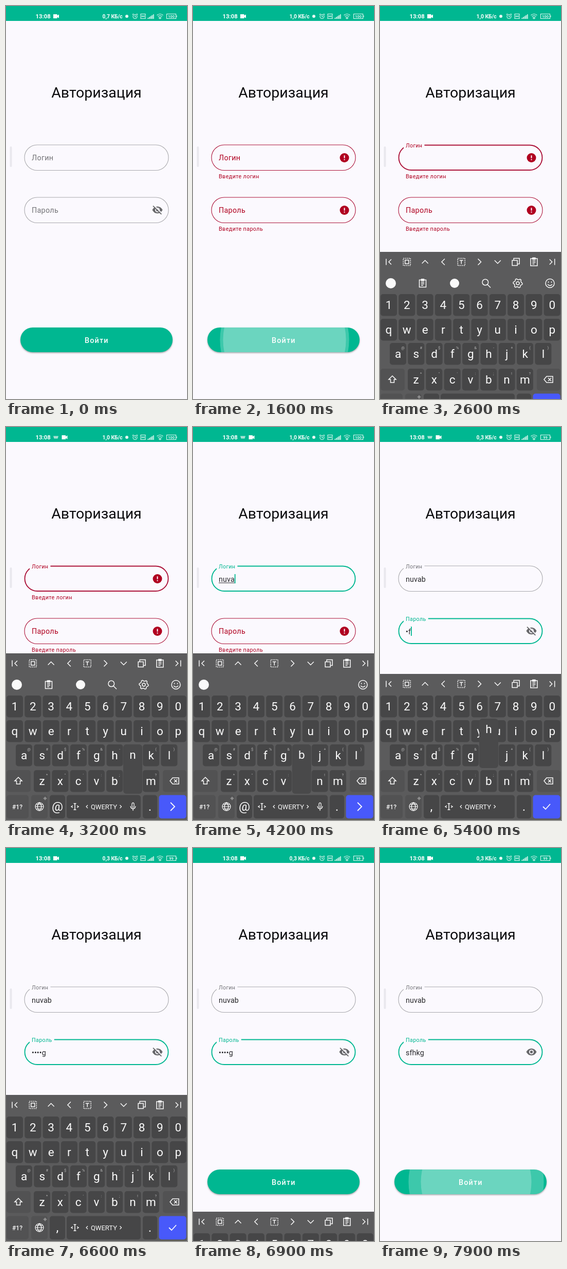
An HTML page with a canvas for the animation above (8 s loop, 352 by 764 pixels).

```html
<!DOCTYPE html>
<html lang="ru">
<head>
<meta charset="utf-8">
<title>Авторизация</title>
<style>
html, body { margin: 0; width: 100%; height: 100%; overflow: hidden; background: #fbf9fe; }
canvas { display: block; width: 352px; height: 764px; }
</style>
</head>
<body>
<canvas id="stage"></canvas>
<script>
const W = 352, H = 764, LOOP = 8000;
const BG = '#fbf9fe', GREEN = '#00b791', RED = '#b00020', GREY = '#737377';
const KEYBOARD = '#5b5b5c', KEY = '#464647', SIDE_KEY = '#525253', WHITE = '#fafafa';
const canvas = document.getElementById('stage');
const ctx = canvas.getContext('2d');
const dpr = window.devicePixelRatio || 1;
canvas.width = W * dpr;
canvas.height = H * dpr;

// Moments of the story, in ms
const ERROR = 400, LOGIN_FOCUS = 2400, PASS_FOCUS = 4700, PASS_KEYS = 4800;
const HIDE = 6650, REVEAL = 7100;
const loginKeys = [['n', 3300], ['u', 3560], ['v', 3800], ['a', 4040], ['b', 4260]];
const passKeys = [['s', 5060], ['f', 5300], ['h', 5480], ['k', 5740], ['g', 6000]];
const strokes = [...loginKeys, ...passKeys];
const LOGIN_START = loginKeys[0][1], PASS_START = passKeys[0][1];

const clamp = v => Math.max(0, Math.min(1, v));
const progress = (t, start, length) => clamp((t - start) / length);
const mix = (a, b, p) => a + (b - a) * p;
const typed = (keys, t) => keys.filter(k => k[1] <= t).map(k => k[0]).join('');

function text(str, x, y, size, color, { weight = 400, align = 'left', spacing = 0 } = {}) {
  ctx.font = `${weight} ${size}px Roboto, sans-serif`;
  ctx.textAlign = align;
  ctx.letterSpacing = spacing + 'px';
  ctx.fillStyle = color;
  ctx.fillText(str, x, y);
  return ctx.measureText(str).width;
}

function box(x, y, w, h, r, color) {
  ctx.fillStyle = color;
  ctx.beginPath();
  ctx.roundRect(x, y, w, h, r);
  ctx.fill();
}

function disc(x, y, r, color) {
  ctx.fillStyle = color;
  ctx.beginPath();
  ctx.arc(x, y, r, 0, Math.PI * 2);
  ctx.fill();
}

// Strokes or fills an SVG path placed around (x, y)
function icon(d, x, y, { color = WHITE, width = 1.5, fill = false } = {}) {
  ctx.save();
  ctx.translate(x, y);
  ctx.lineWidth = width;
  ctx.strokeStyle = ctx.fillStyle = color;
  const path = new Path2D(d);
  fill ? ctx.fill(path) : ctx.stroke(path);
  ctx.restore();
}

const circle = r => `M${-r} 0a${r} ${r} 0 1 0 ${2 * r} 0a${r} ${r} 0 1 0 ${-2 * r} 0z`;
const square = r => `M${-r} ${-r}h${2 * r}v${2 * r}h${-2 * r}z`;
const CLIPBOARD = 'M-6.5 -6.5h13v14h-13zM-2.5 -8h5v3h-5zM-3 -2h6M-3 1h6M-3 4h4';

function statusBar(t) {
  ctx.fillStyle = GREEN;
  ctx.fillRect(0, 0, W, 29);
  text('13:08', 57.5, 24, 11.4, '#fff', { weight: 600 });
  const busy = t >= 2700 && t < 6400;
  if (busy) icon('M-5 -2.5h10l-1.5 5h-7z', 97, 20, { color: '#a5e2d3', fill: true });
  icon('M-5.5 -4h7.5v2.5l3.5 -2v7l-3.5 -2v2.5h-7.5z', busy ? 114 : 97.5, 20, { color: '#fff', fill: true });
  const speed = t < 700 ? '0,7' : t < 5100 ? '1,0' : '0,3';
  text(speed + ' КБ/с', 187.5, 24, 10.3, '#fff', { weight: 600 });

  const thin = { color: '#e6f8f3', width: 1.1 };
  disc(235, 20, 3, '#e6f8f3');
  icon(circle(4) + 'M0 -2.5v3h2M-5 -3.5l2 -2M5 -3.5l-2 -2', 251, 20.5, thin);
  icon(square(4.5) + 'M-2 -2v4M2 -2v4M-2 0h4', 266.5, 20, thin);
  for (let i = 0; i < 5; i++) {
    ctx.fillStyle = '#e6f8f3';
    ctx.fillRect(275.5 + i * 2.6, 23 - i * 1.7, 1.7, 2 + i * 1.7);
  }
  icon('M-6 -2Q0 -7 6 -2M-4 0.5Q0 -3 4 0.5M-2 3Q0 1 2 3L0 5z', 299.5, 20, thin);
  icon('M-9.5 -4.5h18v9h-18zM10 -1.5v3', 322, 20, thin);
  text(t < 5100 ? '100' : '99', 321.5, 22.8, 7.5, '#fff', { weight: 500, align: 'center' });
}

function errorIcon(x, y) {
  disc(x, y, 9, RED);
  ctx.fillStyle = '#fff';
  ctx.fillRect(x - 1, y - 4.6, 2, 5.4);
  ctx.fillRect(x - 1, y + 2.6, 2, 2);
}

function eyeIcon(x, y, open) {
  const color = '#68686b';
  icon('M-10 0Q-6.5 -6.8 0 -6.8T10 0Q6.5 6.8 0 6.8T-10 0z', x, y, { color, fill: true });
  disc(x, y, 4.5, BG);
  disc(x, y, 2.7, color);
  if (open) return;
  icon('M-7 -9L9.5 7.5', x, y, { color: BG, width: 2 });
  icon('M-8.5 -7.8L7.8 8.4', x, y, { color, width: 1.8 });
}

function field({ y, label, hint, value, error, errorAlpha, focused, lift, caret, underline }) {
  const color = error ? RED : focused ? GREEN : GREY;
  const inset = focused ? 0.5 : 0;
  ctx.strokeStyle = error ? '#ac1239' : focused ? GREEN : '#a9a9ad';
  ctx.lineWidth = focused ? 1.9 : 1.1;
  ctx.beginPath();
  ctx.roundRect(36 + inset, y + inset, 280 - 2 * inset, 49.5 - 2 * inset, 24.7 - inset);
  ctx.stroke();

  const size = mix(14.3, 10.75, lift);
  if (lift > 0) {
    ctx.font = '400 10.75px Roboto, sans-serif';
    ctx.letterSpacing = '.35px';
    ctx.fillStyle = BG;
    ctx.fillRect(46, y - 5, (ctx.measureText(label).width + 8) * lift, 12);
  }
  text(label, 50, y + mix(30, 5.3, lift), size, color, { spacing: 0.32 });
  if (error) {
    ctx.globalAlpha = errorAlpha;
    text(hint, 50, y + 65, 10.75, RED, { spacing: 0.4 });
    ctx.globalAlpha = 1;
    errorIcon(294.5, y + 25);
  }
  const width = text(value, 50, y + 30.8, 14.3, '#29292c', { spacing: 0.1 });
  ctx.fillStyle = '#29292c';
  if (underline) ctx.fillRect(50, y + 32.5, width, 1);
  ctx.fillStyle = GREEN;
  if (caret) ctx.fillRect(50 + width, y + 16, 1.8, 18);
}

// The caret restarts its blink at the latest keystroke
function caretOn(t, keys, shownFrom) {
  const last = keys.filter(k => k[1] <= t).pop();
  const base = last ? last[1] : shownFrom;
  return t >= base && (t - base) % 1000 < 500;
}

function form(t) {
  text('Авторизация', 176, 178, 28.5, '#0c0c0e', { align: 'center' });
  box(7.5, 273, 4, 40, 2, '#e9e8ee');

  const errorAlpha = progress(t, ERROR, 160);
  const onLogin = t >= LOGIN_FOCUS && t < PASS_FOCUS;
  const onPass = t >= PASS_FOCUS;
  field({
    y: 270, label: 'Логин', hint: 'Введите логин', value: typed(loginKeys, t),
    error: t >= ERROR && t < LOGIN_START, errorAlpha, focused: onLogin,
    lift: progress(t, LOGIN_FOCUS, 167), underline: onLogin && t >= LOGIN_START,
    caret: onLogin && caretOn(t, loginKeys, 2700)
  });

  const secret = typed(passKeys, t);
  const open = t >= REVEAL;
  const passError = t >= ERROR && t < PASS_START;
  field({
    y: 372, label: 'Пароль', hint: 'Введите пароль',
    value: open ? secret : '•'.repeat(Math.max(0, secret.length - 1)) + secret.slice(-1),
    error: passError, errorAlpha, focused: onPass,
    lift: progress(t, PASS_FOCUS, 167), caret: onPass && caretOn(t, passKeys, PASS_FOCUS)
  });
  if (!passError) eyeIcon(294.5, 396.5, open);
  if (open && t < 7500) {
    disc(295, 396, 18.5, `rgba(0,0,0,${0.1 * (1 - progress(t, 7200, 300))})`);
  }
}

function ripple(t, { start, x, outer, inner, life }) {
  const age = t - start;
  if (age < 0 || age > life) return;
  const grow = 80 * clamp(age / 150);
  const alpha = 0.24 * (1 - progress(age, 180, life - 180));
  for (const r of [outer, inner]) disc(x, 649, r + grow, `rgba(255,255,255,${alpha})`);
}

const taps = [
  { start: 400, x: 178, outer: 125, inner: 119, life: 600 },
  { start: 1600, x: 178, outer: 125, inner: 119, life: 500 },
  { start: 7900, x: 187, outer: 131, inner: 107, life: 500 }
];

function button(t) {
  ctx.save();
  ctx.shadowColor = 'rgba(0,0,0,.35)';
  ctx.shadowBlur = 3 * dpr;
  ctx.shadowOffsetY = 1.5 * dpr;
  box(28, 625, 296, 48, 24, GREEN);
  ctx.restore();
  ctx.save();
  ctx.beginPath();
  ctx.roundRect(28, 625, 296, 48, 24);
  ctx.clip();
  taps.forEach(tap => ripple(t, tap));
  ctx.restore();
  text('Войти', 153, 655, 14.3, '#fff', { weight: 500, spacing: 1.2 });
}

const PITCH = 35.3;
const rows = [
  { chars: '1234567890', x: 17, y: 543, hints: '' },
  { chars: 'qwertyuiop', x: 17, y: 591, hints: '' },
  { chars: 'asdfghjkl', x: 35, y: 638, hints: '@#$%&-+()' },
  { chars: 'zxcvbnm', x: 70, y: 688, hints: '*"\':;!?' }
];
const toolbar = [
  'M-5 -6v12M5 -5l-5 5l5 5',
  square(3.5),
  'M-6 3l6 -6l6 6',
  'M3 -6l-6 6l6 6',
  'M-3.5 -3h7M0 -3v7',
  'M-3 -6l6 6l-6 6',
  'M-6 -3l6 6l6 -6',
  'M-7 -3h10v10h-10zM-4 -3v-4h11v11h-4',
  CLIPBOARD,
  'M5 -6v12M-5 -5l5 5l-5 5'
];

function drawToolbar(y) {
  toolbar.forEach((d, i) => {
    const x = 17 + PITCH * i;
    icon(d, x, y);
    if (i === 1 || i === 4) {
      ctx.setLineDash([2, 1.5]);
      icon(square(7), x, y);
      ctx.setLineDash([]);
    }
  });
}

function drawSuggestions(y, idle) {
  disc(21, y, 10, WHITE);
  icon(circle(8.5) + 'M-4.5 2Q0 7 4.5 2M-3 -3.5v2.5M3 -3.5v2.5', 330.5, y);
  if (!idle) return;
  icon(CLIPBOARD, 83, y);
  disc(145, y, 9, WHITE);
  icon('M-7.5 -2a5.8 5.8 0 1 0 11.6 0a5.8 5.8 0 1 0 -11.6 0M2.5 2.5l6 6', 206.5, y);
  let gear = '';
  for (let i = 0; i <= 24; i++) {
    const a = i * Math.PI / 12, r = i % 4 < 2 ? 9 : 7;
    gear += `${i ? 'L' : 'M'}${r * Math.cos(a)} ${r * Math.sin(a)}`;
  }
  icon(gear + circle(3), 268, y);
}

function drawBottomRow(password) {
  const y = 738;
  const key = (x, w, color = KEY) => box(x, y - 22.5, w, 45.5, 5, color);
  key(1, 43, SIDE_KEY);
  key(49, 32, SIDE_KEY);
  key(85, 30);
  key(118, 144);
  key(266, 28);
  key(297.5, 53, '#4859fa');
  text('#1?', 22, y + 4.5, 12, WHITE, { weight: 500, align: 'center' });
  icon(circle(8) + 'M-8 0h16M0 -8Q-8 0 0 8Q8 0 0 -8M-6.5 -4.5h13M-6.5 4.5h13', 65, y, { width: 1.2 });
  icon(circle(2) + 'M-3.5 0h7M0 -3.5v7', 76, 722, { color: '#aaa', width: 0.8 });
  text(password ? ',' : '@', 100, y + 8, 24.5, WHITE, { align: 'center' });
  icon('M-2.5 -6h5M-2.5 6h5M0 -6v12M-4 -2l-3 2l3 2M4 -2l3 2l-3 2', 134, y);
  icon('M2 -3l-3 3l3 3', 157, y, { width: 1.2 });
  text('QWERTY', 190.5, y + 4.7, 13, WHITE, { align: 'center' });
  icon('M-2 -3l3 3l-3 3', 223.5, y, { width: 1.2 });
  if (!password) icon('M-2 -6Q0 -9 2 -6V0Q0 3 -2 0zM-5 -1Q-4 4 0 4T5 -1M0 4v4', 247, y, { width: 1.3 });
  text('.', 280, y + 8, 24.5, WHITE, { align: 'center' });
  icon(password ? 'M-7 0l5 5l9 -10' : 'M-4 -8l8 8l-8 8', 324, y, { width: 1.8 });
}

function popup(char) {
  const row = rows.find(r => r.chars.includes(char));
  const x = row.x + PITCH * row.chars.indexOf(char);
  box(x - 18.5, row.y - 71, 37, 96, 6, '#49494a');
  text(char, x, row.y - 43, 22.5, WHITE, { align: 'center' });
}

function keyboard(t) {
  const shown = 1 - (1 - progress(t, 2340, 397)) ** 2;
  const hidden = progress(t, HIDE, 300) ** 2;
  if (t < LOGIN_FOCUS || hidden === 1) return;
  const password = t >= PASS_KEYS;
  const top = password ? 480 : 440;
  ctx.save();
  ctx.translate(0, Math.round(324 * (1 - shown + hidden)));
  ctx.fillStyle = KEYBOARD;
  ctx.fillRect(0, top, W, H - top);
  drawToolbar(top + 19.5);
  if (!password) drawSuggestions(501, t < LOGIN_START);

  for (const { chars, x, y, hints } of rows) {
    [...chars].forEach((char, i) => {
      const cx = x + PITCH * i;
      box(cx - 16, y - 21, 32, 42.5, 5, KEY);
      text(char, cx, y + 7.5, 22.5, WHITE, { align: 'center' });
      if (hints) text(hints[i], cx + 9.5, y - 9, 7.5, '#b4b4b4', { align: 'center' });
    });
  }
  box(1, 667, 47, 42.5, 5, SIDE_KEY);
  box(305, 667, 46, 42.5, 5, SIDE_KEY);
  icon('M0 -7l7 7h-3.5v6h-7v-6h-3.5z', 24, 688);
  icon('M-9 0l5 -6h12v12h-12zM-1 -3l6 6M5 -3l-6 6', 328, 688);
  drawBottomRow(password);

  for (const [char, time] of strokes) {
    if (t >= time - 130 && t < time + 30) popup(char);
  }
  ctx.restore();
}

function draw(now) {
  const t = now % LOOP;
  ctx.setTransform(dpr, 0, 0, dpr, 0, 0);
  ctx.fillStyle = BG;
  ctx.fillRect(0, 0, W, H);
  form(t);
  button(t);
  keyboard(t);
  statusBar(t);
}

const began = performance.now();
function tick() {
  draw(performance.now() - began);
  requestAnimationFrame(tick);
}
tick();
</script>
</body>
</html>
```
